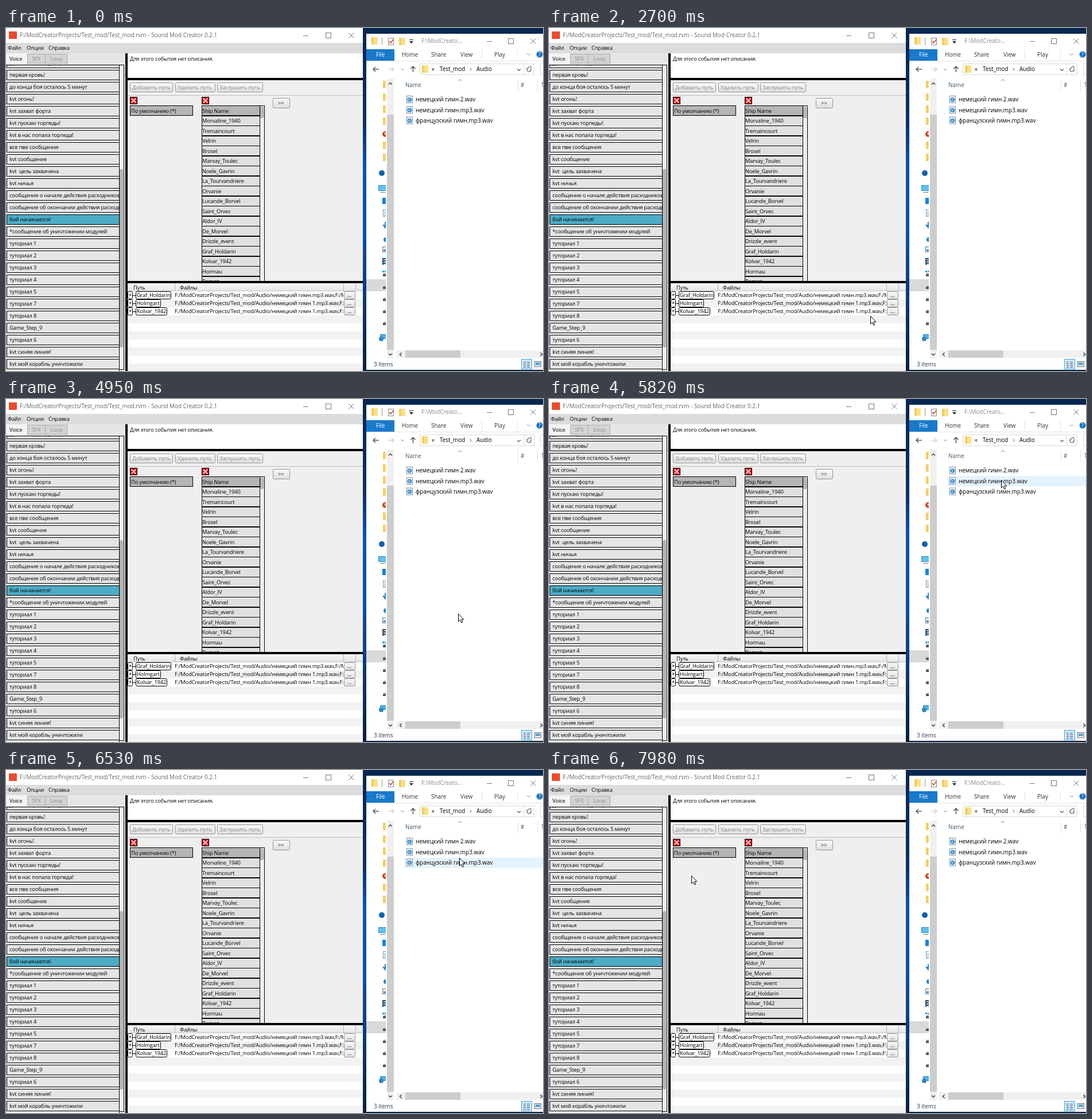
An HTML page with a canvas that plays this animation: 936x598 px, repeating every 8 s.

```html
<!DOCTYPE html>
<html lang="ru">
<head>
<meta charset="utf-8">
<title>Mod editor</title>
<style>
html, body { margin: 0; width: 100%; height: 100%; overflow: hidden; background: #fff; }
canvas { display: block; }
</style>
</head>
<body>
<canvas id="stage" width="936" height="598"></canvas>
<script>
const W = 936, H = 598, LOOP = 8000, STEP = 78;
const stage = document.getElementById('stage').getContext('2d');
const back = document.createElement('canvas');
back.width = W;
back.height = H;
let c = back.getContext('2d');

const EVENTS = ['первая кровь!', 'до конца боя осталось 5 минут', 'kvt огонь!', 'kvt захват форта',
  'kvt пускаю торпеды!', 'kvt в нас попала торпеда!', 'все пве сообщения', 'kvt сообщение',
  'kvt  цель захвачена', 'kvt ничья', 'сообщение о начале действия расходников',
  'сообщение об окончании действия расходников', 'бой начинается!', '*сообщение об уничтожении модулей',
  'туториал 1', 'туториал 2', 'туториал 3', 'туториал 4', 'туториал 5', 'туториал 7', 'туториал 8',
  'Game_Step_9', 'туториал 6', 'kvt синяя линия!', 'kvt мой корабль уничтожили'];
const SHIPS = ['Ship Name', 'Morvaline_1940', 'Tremaincourt', 'Velrin', 'Brosel', 'Marvay_Toulec',
  'Noele_Gavrin', 'La_Tourvandriere', 'Orvanie', 'Lucande_Borvel', 'Saint_Orvec', 'Aldor_IV',
  'De_Morvel', 'Drizzle_event', 'Graf_Holdarin', 'Kolvar_1942', 'Hormau', 'Regent'];
const PATHS = [['Graf_Holdarin', 'немецкий гимн.mp3.wav'], ['Holmgart', 'немецкий гимн 1.mp3.wav'],
  ['Kolvar_1942', 'немецкий гимн 1.mp3.wav']];
const FILES = ['немецкий гимн 2.wav', 'немецкий гимн.mp3.wav', 'французский гимн.mp3.wav'];

// Pointer path: time, x, y
const PATH = [
  [669, 765, 584], [980, 672, 563], [1293, 587, 540], [1450, 560, 526], [1530, 559, 524], [1780, 559, 502],
  [2680, 559, 502], [3000, 583, 501], [3130, 583, 501], [3711, 510, 498], [3860, 496, 498], [3990, 496, 498],
  [4250, 479, 498], [4380, 479, 499], [4560, 560, 502], [4760, 715, 450], [4959, 788, 374], [5190, 787, 257],
  [5240, 787, 257], [5480, 786, 176], [5740, 788, 146], [6050, 789, 124], [6120, 790, 132],
  [6207, 790, 160], [6440, 791, 164], [6680, 788, 130], [6831, 788, 149], [6910, 798, 180],
  [6960, 798, 180], [7200, 738, 209], [7730, 738, 209], [8000, 248, 184]
];

function rect(x, y, w, h, fill, line) {
  if (fill) { c.fillStyle = fill; c.fillRect(x, y, w, h); }
  if (line) { c.strokeStyle = line; c.lineWidth = 1; c.strokeRect(x + .5, y + .5, w - 1, h - 1); }
}

function round(x, y, w, h, r, fill, line) {
  c.beginPath();
  c.roundRect(x + .5, y + .5, w - 1, h - 1, r);
  c.fillStyle = fill;
  c.fill();
  c.strokeStyle = line;
  c.lineWidth = 1;
  c.stroke();
}

function disc(x, y, r, fill) {
  c.beginPath();
  c.arc(x, y, r, 0, 7);
  c.fillStyle = fill;
  c.fill();
}

function poly(points, line, width = 1, fill) {
  c.beginPath();
  for (let i = 0; i < points.length; i += 2) c.lineTo(points[i], points[i + 1]);
  if (fill) { c.closePath(); c.fillStyle = fill; c.fill(); }
  if (line) { c.strokeStyle = line; c.lineWidth = width; c.stroke(); }
}

function text(s, x, y, color = '#000', size = 9.3, gap = -.15) {
  c.font = `${size}px "Open Sans", "Noto Sans", sans-serif`;
  c.letterSpacing = gap + 'px';
  c.fillStyle = color;
  c.fillText(s, x, y + 3.4);
}

const label = (s, x, y, color = '#000') => text(s, x, y, color, 9.92, 0);

function clipped(x, y, w, h, draw) {
  c.save();
  c.beginPath();
  c.rect(x, y, w, h);
  c.clip();
  draw();
  c.restore();
}

// Open angle; dir: 0 right, 1 down, 2 left, 3 up
function chevron(x, y, dir, color, r = 3, width = 1) {
  c.save();
  c.translate(x, y);
  c.rotate(dir * Math.PI / 2);
  poly([-r / 2, -r, r / 2, 0, -r / 2, r], color, width);
  c.restore();
}

function cross(x, y, r, color, width = 1) {
  poly([x - r, y - r, x + r, y + r], color, width);
  poly([x - r, y + r, x + r, y - r], color, width);
}

function windowButtons(min, box, close, y) {
  rect(min - 4, y, 9, 1, '#777');
  rect(box - 5, y - 5, 10, 10, null, '#777');
  cross(close, y, 4.5, '#777');
}

function folder(x, y) {
  rect(x, y, 11, 13, '#fbe08a');
  rect(x, y, 4, 13, '#f5cd5a');
}

function button(s, x, y, w, h, color, pad = 4) {
  const g = c.createLinearGradient(0, y, 0, y + h);
  g.addColorStop(0, '#fafafa');
  g.addColorStop(1, '#dedede');
  round(x, y, w, h, 2, g, '#959595');
  text(s, x + pad, y + h / 2, color, 9.6);
}

function eventList() {
  rect(0, 64, 206, 534, '#efefef');
  clipped(0, 65, 206, 533, () => {
    for (let i = -1; i < EVENTS.length; i++) {
      const y = 82 + i * 21;
      rect(1, y - 9, 197, 18, i === 12 ? '#4dacc6' : '#e4e5e4', '#000');
      clipped(2, y - 8, 195, 16, () => text(EVENTS[i] || 'урон по цели, дрейф', 6, y));
    }
  });
  rect(0, 64, 206, 1, '#000');
  rect(197, 65, 1, 533, '#000');
  rect(205, 65, 1, 531, '#000');
  rect(197, 595, 9, 1, '#000');
  rect(198, 66, 7, 529, '#efefef');
  round(198, 246, 6, 311, 3, '#b5b5b5', '#a0a0a0');
}

function shipList() {
  for (const x of [216, 341]) {
    rect(x, 120, 13, 13, '#d5141c', '#000');
    cross(x + 6.5, 126.5, 3.8, '#fff', 1.6);
  }
  rect(216, 135, 110, 18, '#b5b5b5', '#000');
  text('По умолчанию (*)', 218, 144.5);
  rect(341, 135, 110, 307, '#efefef', '#000');
  clipped(341, 118, 110, 323, () => {
    SHIPS.forEach((name, i) => {
      const y = 144 + i * 17.5;
      rect(341, Math.round(y - 9), 102, 18, i ? '#e0e0e0' : '#b5b5b5', '#000');
      rect(341, Math.round(y + 8), 102, 1.5, '#111');
      text(name, 342, y + .5);
    });
    rect(443, 136, 7, 305, '#efefef');
    round(443, 137, 6, 20, 2, '#bbb', '#999');
  });
  button('>>', 465, 122, 30, 18, '#222', 9);
}

function pathTable() {
  rect(212, 445, 410, 153, '#fff');
  for (let y = 473; y < H; y += 28) rect(212, y, 410, 14, '#f2f2f2');
  const g = c.createLinearGradient(0, 445, 0, 459);
  g.addColorStop(0, '#fafafa');
  g.addColorStop(1, '#e2e2e2');
  rect(212, 445, 410, 14, g);
  rect(212, 458, 410, 1, '#c4c4c4');
  for (const x of [294, 588, 609]) rect(x, 445, 1, 14, '#b4b4b4');
  text('Путь', 222, 453);
  text('Файлы', 303, 453);
  PATHS.forEach(([name, file], i) => {
    const y = 466 + i * 14;
    round(212, y - 7, 9, 14, 2, '#fff', '#000');
    text('*', 214, y + 1);
    rect(221, y, 5, 1, '#000');
    c.font = '9.3px "Open Sans", "Noto Sans", sans-serif';
    c.letterSpacing = '-.15px';
    round(226, y - 7, Math.round(c.measureText(name).width) + 4, 14, 2, '#fff', '#000');
    text(name, 228, y - .5);
    clipped(292, y - 7, 296, 14, () =>
      text(`F:/ModCreatorProjects/Test_mod/Audio/${file},F:/ModCreatorProjects`, 294, y - .5));
    button('...', 589, y - 7, 20, 14, '#000', 6);
  });
}

function editor() {
  rect(0, 0, 622, H, '#efefef');
  rect(0, 0, 622, 26, '#fff');
  rect(5, 6, 14, 13, '#ee4a2c');
  label('F:/ModCreatorProjects/Test_mod/Test_mod.rvm - Sound Mod Creator 0.2.1', 24, 13, '#666');
  windowButtons(522, 562, 602, 13);
  rect(0, 26, 622, 18, '#dcdcdc');
  [['Файл', 3], ['Опции', 36], ['Справка', 74]].forEach(([s, x]) => text(s, x, 35));
  rect(0, 44, 208, 20, '#e6e6e6');
  rect(0, 44, 37, 20, '#f4f4f4');
  rect(37, 45, 32, 17, '#d4d4d4', '#aaa');
  rect(68, 45, 39, 17, '#d4d4d4', '#aaa');
  text('Voice', 6, 54);
  text('SFX', 45, 54, '#8e8e8e', 9.6);
  text('Loop', 77, 54, '#8e8e8e', 9.6);
  eventList();
  rect(212, 44, 410, 43, '#fff');
  text('Для этого события нет описания.', 216, 54);
  button('Добавить путь', 216, 95, 75, 17, '#888');
  button('Удалить путь', 295, 95, 70, 17, '#888');
  button('Заглушить путь', 368, 95, 80, 17, '#888');
  rect(212, 117, 410, 1, '#bdbdbd');
  shipList();
  pathTable();
  rect(208, 44, 4, 554, '#000');
  rect(208, 87, 414, 4, '#000');
  rect(208, 441, 414, 4, '#000');
}

function disk(y) {
  rect(657, y - 1, 6, 4, '#555');
  rect(658, y - 3, 5, 2, '#bbb');
}

function navPane() {
  rect(628, 438, 34, 21, '#d9d9d9');
  clipped(628, 88, 34, 480, () => {
    for (const y of [98, 120, 141, 162, 204, 225]) folder(657, y - 6);
    disc(661, 185, 5, '#d0451b');
    rect(660, 182, 1.5, 4, '#fff');
    disc(655, 253, 5, '#0a64b4');
    rect(649, 274, 14, 10, '#5cc3f2', '#3a86b0');
    rect(652, 286, 9, 1, '#777');
    rect(656, 296, 8, 11, '#1583de');
    rect(657, 316, 8, 13, '#fff', '#7b95ad');
    for (const y of [320, 323, 326]) rect(659, y, 4, 1, '#4a9ee0');
    rect(660, 338, 3, 7, '#2a86d6');
    poly([656, 343, 661, 350, 666, 343], null, 1, '#2a86d6');
    disc(662, 369, 4, '#1c86d1');
    rect(656, 381, 9, 10, '#e8f2fa', '#5a7890');
    rect(658, 386, 5, 3, '#3d8ccb');
    rect(656, 401, 8, 12, '#344f6b');
    for (const y of [403, 407, 411]) rect(658, y, 5, 2, '#a9cdea');
    rect(656, 423, 3, 3, '#1a9be8');
    rect(660, 423, 3, 3, '#1a9be8');
    for (const y of [430, 452, 473, 494, 515]) disk(y);
    rect(652, 534, 11, 8, '#4db4ea', '#2b7fb2');
    disc(654, 542, 4, '#2c87c4');
  });
  rect(664, 88, 12, 488, '#f0f0f0');
  rect(664, 151, 12, 410, '#cdcdcd');
  chevron(670, 97, 3, '#444', 3, 1.5);
  chevron(670, 569, 1, '#444', 3, 1.5);
}

function explorer() {
  const g = c.createLinearGradient(0, 0, 0, H);
  g.addColorStop(0, '#06264f');
  g.addColorStop(.28, '#07316b');
  g.addColorStop(.4, '#0a55ab');
  g.addColorStop(.62, '#0b4e9c');
  g.addColorStop(1, '#04203f');
  rect(622, 0, 314, H, g);
  rect(628, 10, 308, 586, '#fff');

  folder(637, 16);
  rect(655, 16, 1, 14, '#999');
  rect(666, 17, 10, 13, '#fff', '#888');
  poly([668, 23, 670.5, 26, 675, 20], '#c8452c', 1.6);
  folder(685, 17);
  rect(703, 20, 7, 1, '#222');
  poly([703, 23, 710, 23, 706.5, 27], null, 1, '#222');
  label('F:\\ModCreato...', 724, 23, '#8a8a8a');
  windowButtons(842, 880, 919, 23);

  rect(628, 37, 49, 20, '#1979ca');
  label('File', 645, 47, '#fff');
  [['Home', 690], ['Share', 741], ['View', 792], ['Play', 851]].forEach(([s, x]) => label(s, x, 47, '#333'));
  rect(829, 38, 1, 16, '#e2e2e2');
  rect(891, 38, 1, 16, '#e2e2e2');
  chevron(911, 46, 1, '#888');
  disc(930, 46, 5.5, '#1474c4');
  label('?', 927.8, 46.3, '#fff');
  rect(628, 57, 308, 1, '#e3e3e3');

  poly([650, 72, 640, 72], '#444', 1.3);
  chevron(642, 72, 2, '#444', 4, 1.3);
  poly([666, 72, 676, 72], '#ccc', 1.3);
  chevron(674, 72, 0, '#ccc', 4, 1.3);
  chevron(691, 72, 1, '#777', 2.5);
  poly([709.5, 77, 709.5, 67], '#444', 1.3);
  chevron(709.5, 69, 3, '#444', 4, 1.3);
  rect(721, 62, 200, 20, '#fff', '#d9d9d9');
  folder(725, 65);
  label('«', 742, 71.5);
  label('Test_mod', 756, 72);
  chevron(810, 72, 0, '#555', 2.5);
  label('Audio', 820, 72);
  chevron(894, 73, 1, '#555', 3, 1.2);
  rect(902, 62, 1, 20, '#d9d9d9');
  c.beginPath();
  c.arc(911.5, 72.5, 3.5, -.4, 4.9);
  c.strokeStyle = '#555';
  c.lineWidth = 1.2;
  c.stroke();
  poly([911, 67, 915, 67, 915, 71], '#555', 1);
  rect(931, 62, 10, 20, '#fff', '#d9d9d9');

  navPane();

  chevron(791, 91, 3, '#777', 3);
  label('Name', 696, 99.5, '#43566e');
  label('#', 897, 99.5, '#43566e');
  label('T', 933, 99.5, '#43566e');
  rect(892, 89, 1, 21, '#e2e2e2');
  rect(926, 89, 1, 21, '#e2e2e2');

  rect(680, 562, 256, 13, '#f0f0f0');
  rect(696, 562, 96, 13, '#cdcdcd');
  chevron(688, 569, 2, '#444', 3, 1.5);
  chevron(933, 569, 0, '#444', 3, 1.5);
  label('3 items', 641, 587, '#223a55');
  rect(898, 577, 19, 18, '#cce8ff', '#4ba3dd');
  for (const y of [582, 585, 588, 591]) {
    for (const x of [902, 908]) rect(x, y, x === 902 ? 4 : 5, 1, '#555');
  }
  rect(921, 581, 12, 10, '#fff', '#666');
  rect(923, 583, 8, 5, '#5aa7dd');
}

function fileRows(hot) {
  FILES.forEach((name, i) => {
    const y = 125 + i * 18.3;
    if (i === hot) rect(694, Math.round(y - 9), 242, 18, '#e5f3ff');
    rect(698, y - 7, 11, 13, '#f4f9fd', '#7b8fa2');
    disc(703.5, y, 3.8, '#2583cb');
    disc(703.5, y, 2, '#d8edfb');
    disc(704, y, 1, '#17609c');
    label(name, 714, y);
  });
}

function treeMarks(alpha) {
  if (alpha <= 0) return;
  c.globalAlpha = alpha;
  chevron(638.5, 253, 0, '#a6a6a6');
  chevron(638.5, 280.5, 1, '#555', 3);
  for (let i = 0; i < 11; i++) chevron(645.5, 302 + i * 21.1, 0, '#a6a6a6');
  chevron(638.5, 539.5, 0, '#a6a6a6');
  c.globalAlpha = 1;
}

function pointerAt(t) {
  const i = PATH.findIndex(p => p[0] >= t);
  if (i === 0) return PATH[0].slice(1);
  const [t0, x0, y0] = PATH[i - 1], [t1, x1, y1] = PATH[i];
  const k = (t - t0) / (t1 - t0);
  return [Math.round(x0 + (x1 - x0) * k), Math.round(y0 + (y1 - y0) * k)];
}

function pointer(x, y) {
  c.save();
  c.translate(x, y);
  poly([.5, .5, .5, 14, 3.5, 11.2, 5.6, 16, 7.8, 15, 5.7, 10.4, 9.7, 10.4, .5, .5], '#000', 1, '#fff');
  c.restore();
}

const clamp = v => Math.max(0, Math.min(1, v));
const pulse = (t, a, b, c, d) => Math.min(clamp((t - a) / (b - a)), clamp((d - t) / (d - c)));

function frame(now) {
  const t = now % LOOP;
  const held = Math.min(LOOP, Math.floor((t - 20) / STEP) * STEP + 45);
  const shown = t >= 680;
  const [x, y] = pointerAt(held);
  const row = Math.floor((y - 115.5) / 18.3);
  c.drawImage(back, 0, 0);
  fileRows(shown && x > 693 && row >= 0 && row < 3 ? row : -1);
  treeMarks(pulse(held, 1000, 1180, 1500, 1800) + .5 * pulse(held, 7740, 7820, 7880, 7980));
  if (shown) pointer(x, y);
  requestAnimationFrame(frame);
}

editor();
explorer();
c = stage;
requestAnimationFrame(frame);
</script>
</body>
</html>
```
